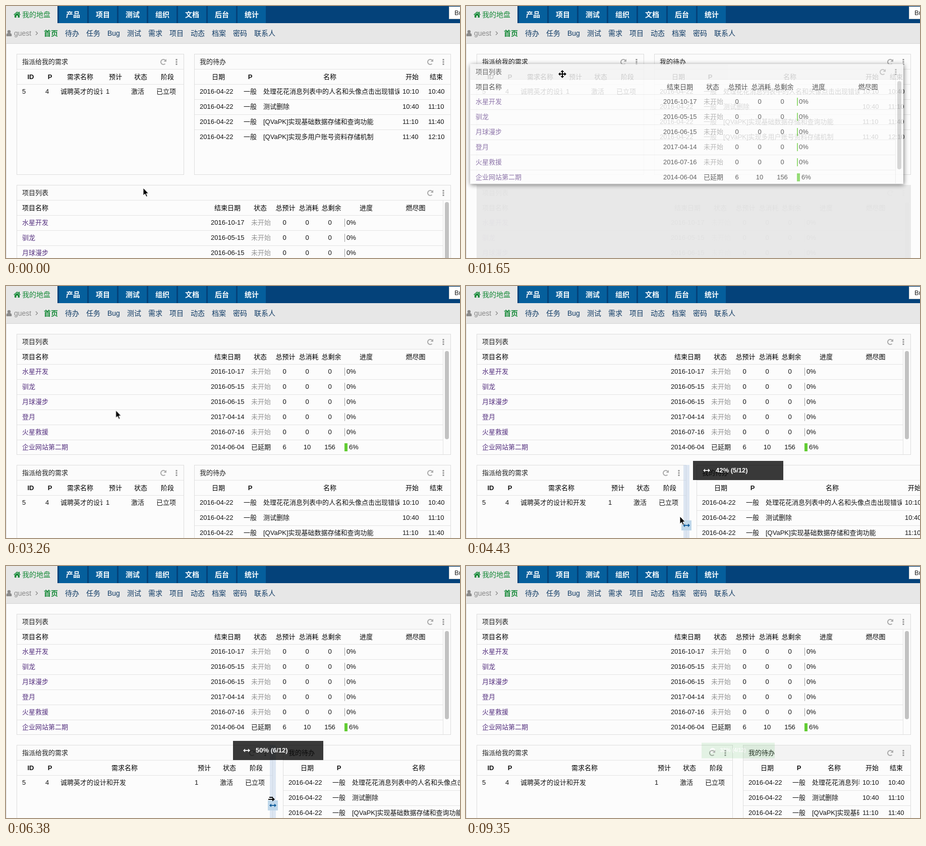
These frames come from a looping animation (900x500 px, 9.45 s). An HTML page:

```html
<!DOCTYPE html>
<html lang="zh">
<head>
<meta charset="utf-8">
<title>Dashboard</title>
<style>
html, body { margin: 0; width: 100%; height: 100%; overflow: hidden; }
#stage {
  position: relative; width: 900px; height: 500px; overflow: hidden; background: #fcfcfc; color: #141414;
  font: 13px/30px "Liberation Sans", "Noto Sans CJK SC", "Noto Sans CJK", sans-serif;
}
#stage div, #stage svg { position: absolute; box-sizing: border-box; white-space: pre; }
#stage svg { overflow: visible; }
#stage .mid { transform: translateX(-50%); }
.bold { font-weight: 700; }
.th { font-weight: 500; color: #000; }
.nav { left: 0; top: 0; width: 900px; height: 34px; background: #04427a; font-size: 14px; line-height: 34px; }
.tab { top: 0; width: 56px; height: 34px; background: #055f9c; color: #fff; text-align: center; }
.home { left: 0; top: 0; width: 102px; height: 34px; background: #e7e7e7; color: #168a38; font-weight: 500; }
.search { left: 878px; top: 1px; width: 30px; height: 25px; background: #fff; border: 1px solid #ccc; font-size: 13px; line-height: 23px; font-weight: 400; color: #222; }
.sub { left: 0; top: 34px; width: 900px; height: 41px; background: #e7e7e7; border-bottom: 1px solid #d4d4d4; font-size: 14px; line-height: 40px; color: #113c66; }
.edge { left: 0; top: 75px; width: 1px; height: 425px; background: #ddd; }
.panel { height: 240px; border: 1px solid #ddd; background: #fcfcfc; }
.clip { left: 0; top: 0; width: 100%; height: 100%; overflow: hidden; }
.head { left: 0; top: 0; width: 100%; height: 29px; background: #fbfbfb; color: #222; font-weight: 500; }
.line { left: 0; height: 1px; background: #e4e4e4; }
.link { color: #55307f; }
.dim { color: #959595; }
.cut { overflow: hidden; }
.thumb { right: 3px; top: 33px; width: 8px; height: 175px; border-radius: 4px; background: #c2c2c2; }
.slot { background: #e8e8e8; border-color: #e8e8e8; }
.slot .clip { opacity: .03; }
.grip { right: -7px; top: -1px; width: 12px; height: 240px; background: rgba(196, 212, 234, .55); }
.knob { left: -4px; top: 110px; width: 20px; height: 20px; background: #bfd7ea; }
.tip { left: 450px; top: 347px; width: 179px; height: 38px; line-height: 38px; color: #fff; font-weight: 700; }
</style>
</head>
<body>
<div id="stage"></div>
<script>
const LOOP = 9450;
const stage = document.getElementById('stage');

function box(parent, cls, style = {}, text = '') {
  const el = document.createElement('div');
  el.className = cls;
  el.textContent = text;
  Object.assign(el.style, style);
  parent.append(el);
  return el;
}

// Negative x counts from the right edge.
const at = x => x < 0 ? `calc(100% - ${-x}px)` : x + 'px';
const label = (parent, x, y, text, cls = '') => box(parent, cls, { left: at(x), top: y + 'px' }, text);
const line = (parent, y, width = '100%') => box(parent, 'line', { top: y + 'px', width });

function icon(parent, x, y, body, color) {
  const holder = box(parent, '', { left: at(x), top: y + 'px' });
  holder.innerHTML = `<svg width="1" height="1" fill="none" stroke="${color}" style="left:0;top:0">${body}</svg>`;
  return holder;
}

// Each step is [time, props, jumps until the next step].
function play(el, steps) {
  const frames = steps.map(([t, props, n = 1]) => ({ ...props, offset: t / LOOP, easing: `steps(${n}, end)` }));
  frames.push({ ...steps[steps.length - 1][1], offset: 1 });
  el.animate(frames, { duration: LOOP, iterations: Infinity });
}
const track = (el, prop, steps, unit = '') =>
  play(el, steps.map(([t, v, n]) => [t, { [prop]: v + unit }, n]));

const arrows = color =>
  `<path stroke-width="1.8" d="M-5 0H5"/><path stroke="none" fill="${color}" d="M-7 0L-3 -3.5V3.5ZM7 0L3 -3.5V3.5Z"/>`;

// Navigation
const nav = box(stage, 'nav bold');
const home = box(nav, 'home');
icon(home, 22, 17, '<path stroke="none" fill="#168a38" d="M-7 0L0 -6L3 -3.5V-5.5H5V-1.8L7 0L6 1L0 -4L-6 1ZM-5 1L0 -3L5 1V6H1.5V2H-1.5V6H-5Z"/>', 'none');
label(home, 32, 0, '我的地盘');
['产品', '项目', '测试', '组织', '文档', '后台', '统计'].forEach((name, i) =>
  box(nav, 'tab', { left: 105 + 59 * i + 'px' }, name));
label(box(stage, 'search'), 10, 0, 'Bug');

const sub = box(stage, 'sub');
icon(sub, 6, 20, '<path stroke="none" fill="#8a8a8a" d="M-5 6C-6 1 -4 0 -2 0H2C4 0 6 1 5 6Z"/><circle cy="-3" r="3.2" stroke="none" fill="#8a8a8a"/>', 'none');
label(sub, 16, 0, 'guest').style.color = '#8a8a8a';
icon(sub, 59, 20, '<path stroke-width="1.3" d="M0 -3.5L3.5 0L0 3.5"/>', '#8a8a8a');
label(sub, 75, 0, '首页', 'bold').style.color = '#168a38';
['待办', '任务', 'Bug', '测试', '需求', '项目', '动态', '档案', '密码', '联系人'].forEach((name, i) =>
  label(sub, 117 + 42 * i - (i > 2 ? 3 : 0), 0, name));
box(stage, 'edge');

// Panels
function panel(title, left, top, width, cls = '') {
  const el = box(stage, 'panel ' + cls, { left: left + 'px', top: top + 'px', width: width + 'px' });
  const body = box(el, 'clip');
  const head = box(body, 'head');
  label(head, 10, 0, title);
  icon(head, -40, 15, '<path stroke-width="2" d="M3.5 3.6A5 5 0 1 1 3.6 -3.4"/><path stroke="none" fill="#aaa" d="M6 -6V-0.5H0.5Z"/>', '#aaa');
  icon(head, -14, 15, '<path stroke-width="3" stroke-dasharray="3 1.5" d="M0 -6V6"/>', '#999');
  line(body, 29);
  return { el, body, head };
}

function projects(cls) {
  const p = panel('项目列表', 21, 355, 861, cls);
  const { body } = p;
  label(body, 10, 30, '项目名称', 'th');
  const heads = { 结束日期: -442, 状态: -377, 总预计: -327, 总消耗: -281, 总剩余: -236, 进度: -167, 燃尽图: -69 };
  for (const name in heads) label(body, heads[name], 30, name, 'th mid');
  p.bars = [];
  [
    ['水星开发', '2016-10-17'], ['驯龙', '2016-05-15'], ['月球漫步', '2016-06-15'],
    ['登月', '2017-04-14'], ['火星救援', '2016-07-16'], ['企业网站第二期', '2014-06-04', 6, 10, 156]
  ].forEach(([name, date, plan = 0, used = 0, left = 0], i) => {
    const y = 59 + 30 * i;
    line(body, y, at(-15));
    label(body, 10, y, name, 'link');
    label(body, -475, y, date);
    label(body, -395, y, plan ? '已延期' : '未开始', plan ? '' : 'dim');
    [plan, used, left].forEach((v, k) => label(body, 45 * k - 329, y, v, 'mid'));
    const bar = box(body, '', {
      left: at(-210), top: y + 7 + 'px', width: (plan || 1) + 'px', height: '16px', background: plan ? '#62cc33' : '#999'
    });
    if (!plan) p.bars.push(bar);
    label(body, plan ? -201 : -206, y, plan + '%');
  });
  box(body, 'line', { left: at(-15), top: '30px', width: '1px', height: '210px' });
  box(body, 'thumb');
  return p;
}

const slot = projects('slot').el;

const needs = panel('指派给我的需求', 21, 95, 332);
const nb = needs.body;
[['ID', 27], ['P', 65]].forEach(([s, x]) => label(nb, x, 30, s, 'bold mid'));
[['预计', -135], ['状态', -85], ['阶段', -32]].forEach(([s, x]) => label(nb, x, 30, s, 'th mid'));
box(nb, 'th', { left: '76px', right: '156px', top: '30px', textAlign: 'center' }, '需求名称');
line(nb, 59);
[['5', 10], ['4', 56], ['1', -154], ['激活', -104], ['已立项', -54]].forEach(([s, x]) => label(nb, x, 59, s));
box(nb, 'cut', { left: '86px', right: '160px', top: '59px' }, '诚聘英才的设计和开发');

const todos = panel('我的待办', 373, 95, 509);
const tb = todos.body;
label(tb, 110, 30, 'P', 'bold mid');
[['日期', 47], ['开始', -76], ['结束', -28]].forEach(([s, x]) => label(tb, x, 30, s, 'th mid'));
box(tb, 'th', { left: '126px', right: '97px', top: '30px', textAlign: 'center' }, '名称');
const hours = ['10:10', '10:40', '11:10', '11:40', '12:10'];
['处理花花消息列表中的人名和头像点击出现错误', '测试删除', '[QVaPK]实现基础数据存储和查询功能', '[QVaPK]实现多用户账号资料存储机制'].forEach((name, i) => {
  const y = 59 + 30 * i;
  line(tb, y);
  label(tb, 10, y, '2016-04-22');
  label(tb, 97, y, '一般');
  box(tb, 'cut', { left: '136px', right: '101px', top: y + 'px' }, name);
  label(tb, -95, y, hours[i]);
  label(tb, -44, y, hours[i + 1]);
});

function grip(owner, from, to) {
  const el = box(owner.el, 'grip');
  icon(box(el, 'knob'), 10, 10, arrows('#0b5a99'), '#0b5a99');
  track(el, 'opacity', [[0, 0], [from, 1], [to, 0]]);
}
grip(needs, 3990, 6670);
grip(todos, 7550, 8450);

// Drag the project list to the top
const list = projects();
const GRAB = 750, SWAP = 1940, DROP = 2960;
const whileHeld = (el, rest, held, after = rest) => play(el, [[0, rest], [GRAB, held], [DROP, after]]);
play(list.el, [
  [0, 21, 355], [900, 24, 338, 4], [1500, 28, 112], [1650, 8, 115, 5], [2380, -48, 108], [2670, -50, 107], [DROP, 21, 95]
].map(([t, x, y, n]) => [t, { left: x + 'px', top: y + 'px' }, n]));
whileHeld(list.el,
  { opacity: 1, width: '861px', height: '240px', borderColor: '#ddd', boxShadow: '1px 2px 9px rgba(0,0,0,0)' },
  { opacity: .85, width: '859px', height: '238px', borderColor: '#f3f3f3', boxShadow: '1px 2px 9px rgba(0,0,0,.6)' });
whileHeld(list.body, { opacity: 1 }, { opacity: .78 });
whileHeld(list.head, { backgroundColor: '#fbfbfb' }, { backgroundColor: '#f1f1f1' }, { backgroundColor: '#f8f8f8' });
list.bars.forEach(bar =>
  whileHeld(bar, { backgroundColor: '#999', width: '1px' }, { backgroundColor: '#62cc33', width: '2px' }));
track(slot, 'top', [[0, 355], [SWAP, 95]], 'px');
for (const p of [needs, todos]) track(p.el, 'top', [[0, 95], [SWAP, 355]], 'px');

// Resize the two lower panels
const grow = [[0, 0], [4140, 22], [4280, 58], [4430, 84], [4580, 88], [6080, 112], [6230, 154], [6380, 176]];
const shift = base => grow.map(([t, d]) => [t, base + d]);
track(needs.el, 'width', shift(332), 'px');
track(todos.el, 'left', shift(373), 'px');
track(todos.el, 'width', [[0, 509], [6820, 400], [6960, 333], [7700, 341], [7850, 337], [8000, 333]], 'px');
track(todos.head, 'backgroundColor', [[0, '#fbfbfb'], [6960, '#f3f3f3']]);

// Messages
function tip(text, done, steps) {
  const el = box(stage, 'tip', { background: done ? '#38b03f' : '#000' });
  const check = '<circle r="6.5" stroke="none" fill="#fff"/><path stroke="#38b03f" stroke-width="2" d="M-3 0L-1 2.5L3.5 -2"/>';
  icon(el, 27, 19, done ? check : arrows('#fff'), '#fff');
  label(el, 45, 0, text);
  play(el, [[0, 0], ...steps].map(([t, opacity, scale = 1]) => [t, { opacity, transform: `scale(${scale})` }]));
}
tip('42% (5/12)', false, [[4280, .4], [4430, .77], [4580, .97], [6080, 0]]);
tip('50% (6/12)', false, [[6230, .4], [6380, .77], [6520, .97], [6670, 0]]);
tip('50% (6/12)', true, [[6670, .5], [6820, .97], [7550, 0]]);
tip('33% (4/12)', false, [[7550, .5], [7700, .97], [8300, 0]]);
tip('33% (4/12)', true, [[8300, .5], [8450, .97], [9350, .12, .81]]);

// Pointer
const pointer = box(stage, '', { left: 0, top: 0 });
const arrow = icon(pointer, 0, 0, '<path fill="#000" stroke-width="1" d="M0 0V15L3.5 11.8L6 17.5L8.4 16.4L6 11H10.5Z"/>', '#fff');
const move = icon(pointer, 0, 0,
  '<path stroke="#fff" stroke-width="4" d="M-6 0H6M0 -6V6"/><path stroke-width="2" d="M-5 0H5M0 -5V5"/>' +
  '<path stroke="none" fill="#000" d="M-8 0L-4 -3.5V3.5ZM8 0L4 -3.5V3.5ZM0 -8L-3.5 -4H3.5ZM0 8L-3.5 4H3.5Z"/>', '#000');
const side = icon(pointer, 0, 0,
  '<path stroke="#fff" stroke-width="4" d="M-6 1H5"/><path stroke-width="2" d="M-6 1H4M-4 -3H3"/><path stroke="none" fill="#000" d="M7 1L2 -3.5V5Z"/>', '#000');
track(arrow, 'opacity', [[0, 1], [GRAB, 0], [DROP, 1], [6230, 0]]);
track(move, 'opacity', [[0, 0], [GRAB, 1], [DROP, 0]]);
track(side, 'opacity', [[0, 0], [6230, 1]]);
play(pointer, [
  [0, 272, 361], [600, 249, 366], [750, 205, 375], [900, 207, 358, 4], [1500, 211, 132], [1650, 191, 135, 5],
  [2380, 143, 128], [2670, 141, 127], [2960, 150, 140, 6], [3840, 353, 460], [4140, 375, 459, 2], [4430, 424, 457],
  [4880, 440, 457], [5030, 455, 459], [5330, 474, 460], [5480, 493, 461], [6080, 505, 462, 2], [6380, 526, 462],
  [6670, 530, 462, 3], [7110, 566, 461], [7260, 731, 461], [7550, 876, 463], [7700, 881, 463], [8450, -40, 463]
].map(([t, x, y, n]) => [t, { transform: `translate(${x}px, ${y}px)` }, n]));
</script>
</body>
</html>
```
